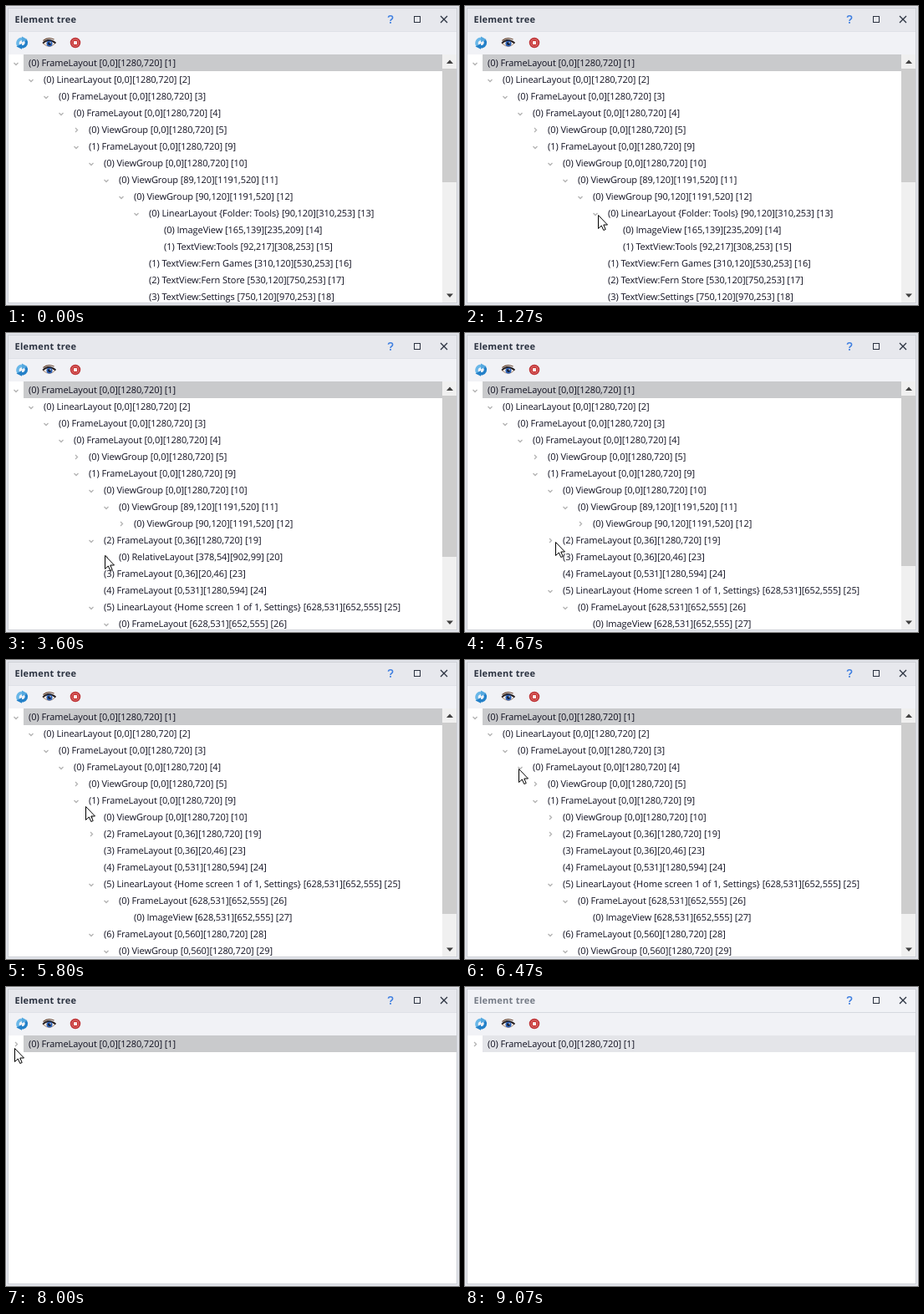
Animation of 542x358 px, one loop 9140 ms. Source, as an HTML page:

```html
<!DOCTYPE html>
<html lang="en">
<head>
<meta charset="utf-8">
<title>Element tree</title>
<style>
  html, body { margin: 0; width: 100%; height: 100%; overflow: hidden; background: #e3e5eb; }
  svg { display: block; }
  text {
    font: 11px "Open Sans", "Noto Sans", sans-serif;
    letter-spacing: -0.07px;
    text-rendering: geometricPrecision;
    fill: #101020;
    white-space: pre;
  }
  #title { font-weight: 700; letter-spacing: 0.25px; fill: #2b3240; }
  #titlebar { fill: #e7e8ed; }
  #separator { stroke: #dfe1e7; }
  #selected { fill: #c9cacc; }
  .inactive #title { fill: #757b86; }
  .inactive #titlebar { fill: #f1f2f6; }
  .inactive #separator { stroke: #d6d9df; }
  .inactive #selected { fill: #e4e5e9; }
  .chevron { fill: none; stroke: #b2b2b2; stroke-width: 1.3; }
</style>
</head>
<body>
<svg id="stage" width="542" height="358" viewBox="0 0 542 358">
  <rect width="542" height="358" fill="#e3e5eb"/>
  <rect id="titlebar" x="2" y="2" width="538" height="28"/>
  <rect x="2" y="30" width="538" height="28" fill="#f1f2f6"/>
  <rect x="3" y="58" width="536" height="297" fill="#fff"/>
  <path id="separator" d="M3 30.5H539"/>

  <text id="title" x="10.5" y="20">Element tree</text>
  <path d="M457.5 13.8Q457.5 11.7 460 11.7Q462.6 11.7 462.6 13.9Q462.6 15.2 461.2 16Q460 16.7 460 18" fill="none" stroke="#3f7fe0" stroke-width="1.6"/>
  <rect x="459.1" y="19" width="1.8" height="1.8" fill="#3f7fe0"/>
  <rect x="488.5" y="12.5" width="7" height="7" fill="none" stroke="#2b3240"/>
  <path d="M520 12L528 20M528 12L520 20" stroke="#2b3240" stroke-width="1.3"/>

  <g id="refresh">
    <path d="M15 47.500A5 5 0 0 1 18 39.500H20" fill="none" stroke="#69b7e8" stroke-width="3.400"/>
    <path d="M19 36.500L25.500 40L19 43.500Z" fill="#55a9e0"/>
    <path d="M23.500 41A5 5 0 0 1 20.500 48.800H18" fill="none" stroke="#2380c8" stroke-width="3.400"/>
    <path d="M19 51.800L12.500 48.500L19 45Z" fill="#2380c8"/>
  </g>

  <g id="eye">
    <path d="M44.500 45Q51 38.500 59 44.500Q52.500 52 44.500 45Z" fill="#fbf6f0" stroke="#9b7a62" stroke-width=".9"/>
    <path d="M44 44.500Q51 37.500 59.500 44.500" fill="none" stroke="#201a1c" stroke-width="1.700"/>
    <path d="M44.500 41.500Q50 36.500 57.500 40" fill="none" stroke="#6c4a36" stroke-width="1.200"/>
    <circle cx="52" cy="45" r="3.600" fill="#2c5fb4"/>
    <circle cx="52" cy="45" r="1.800" fill="#101828"/>
    <circle cx="53" cy="44" r=".8" fill="#fff"/>
  </g>

  <g id="stop">
    <circle cx="83" cy="44" r="5.400" fill="#e08a89" stroke="#bf3336" stroke-width="1.700"/>
    <circle cx="83" cy="44" r="3.700" fill="#c9302f"/>
    <rect x="81" y="42" width="4" height="4" rx=".5" fill="#f8eaea"/>
  </g>

  <rect id="selected" x="21" y="58" height="20"/>
  <g id="rows"></g>

  <g id="scrollbar">
    <rect x="522" y="58" width="17" height="297" fill="#f0f0f0"/>
    <rect id="thumb" x="522" y="75" width="17" fill="#cdcdcd"/>
    <path d="M527 69L531 64.500L535 69ZM527 344.500L531 349L535 344.500Z" fill="#404040"/>
  </g>

  <rect x="0" y="355" width="542" height="3" fill="#e3e5eb"/>
  <rect x="2.500" y="2.500" width="537" height="353" fill="none" stroke="#cdd0d6"/>
  <path id="cursor" d="M.5 .5V16.500L4.300 13L6.800 18.500L9.200 17.500L6.800 12H11.500Z" fill="#fff" stroke="#000"/>
</svg>

<script>
const LOOP = 9140;
const TICK = 200 / 3;
const TOP = 68, ROW = 20, INDENT = 18;
const LEAVE = 136;

// id, depth, label
const nodes = [
  [1, 0, "(0) FrameLayout [0,0][1280,720]"],
  [2, 1, "(0) LinearLayout [0,0][1280,720]"],
  [3, 2, "(0) FrameLayout [0,0][1280,720]"],
  [4, 3, "(0) FrameLayout [0,0][1280,720]"],
  [5, 4, "(0) ViewGroup [0,0][1280,720]"],
  [9, 4, "(1) FrameLayout [0,0][1280,720]"],
  [10, 5, "(0) ViewGroup [0,0][1280,720]"],
  [11, 6, "(0) ViewGroup [89,120][1191,520]"],
  [12, 7, "(0) ViewGroup [90,120][1191,520]"],
  [13, 8, "(0) LinearLayout {Folder: Tools} [90,120][310,253]"],
  [14, 9, "(0) ImageView [165,139][235,209]"],
  [15, 9, "(1) TextView:Tools [92,217][308,253]"],
  [16, 8, "(1) TextView:Fern Games [310,120][530,253]"],
  [17, 8, "(2) TextView:Fern Store [530,120][750,253]"],
  [18, 8, "(3) TextView:Settings [750,120][970,253]"],
  [19, 5, "(2) FrameLayout [0,36][1280,720]"],
  [20, 6, "(0) RelativeLayout [378,54][902,99]"],
  [21, 7, "(0) EditText:Search Games and Apps [378,54][902,99]"],
  [22, 7, "(1) View [858,64][860,88]"],
  [23, 5, "(3) FrameLayout [0,36][20,46]"],
  [24, 5, "(4) FrameLayout [0,531][1280,594]"],
  [25, 5, "(5) LinearLayout {Home screen 1 of 1, Settings} [628,531][652,555]"],
  [26, 6, "(0) FrameLayout [628,531][652,555]"],
  [27, 7, "(0) ImageView [628,531][652,555]"],
  [28, 5, "(6) FrameLayout [0,560][1280,720]"],
  [29, 6, "(0) ViewGroup [0,560][1280,720]"],
  [30, 7, "(0) View [0,560][1280,720]"]
];

// tick at which each node closes
const closeAt = { 5: 0, 13: 20, 12: 33, 20: 54, 19: 70, 10: 81, 4: 98, 1: 114 };

// tick, x, y; the last value marks a stop, reached with easing
const path = [
  [11, 196, 350, 0], [19, 159, 250, 1],
  [25, 159, 250, 0], [31, 142, 231, 1],
  [40, 142, 231, 0], [52, 118, 266, 1],
  [64, 118, 266, 0], [69, 108, 250, 1],
  [71, 108, 250, 0], [78, 105, 197, 0], [80, 104, 190, 1],
  [84, 104, 190, 0], [87, 95, 175, 0], [97, 64, 130, 1],
  [99, 64, 130, 0], [105, 31, 96, 0], [112, 14, 71, 1],
  [117, 14, 71, 0], [123, 7, 75, 1]
];

const $ = id => document.getElementById(id);

function add(parent, tag, attrs) {
  const el = document.createElementNS("http://www.w3.org/2000/svg", tag);
  for (const key in attrs) el.setAttribute(key, attrs[key]);
  return parent.appendChild(el);
}

const rows = nodes.map(([id, depth, label], i) => {
  const g = add($("rows"), "g", {});
  add(g, "text", { x: 27 + depth * INDENT, y: 4 }).textContent = `${label} [${id}]`;
  const next = nodes[i + 1];
  const parent = id in closeAt || (next && next[1] > depth);
  const chevron = parent && add(g, "path", {
    class: "chevron", transform: `translate(${12 + depth * INDENT} 0)`
  });
  return { id, depth, g, chevron };
});

function drawTree(tick) {
  let count = 0;
  let hiddenBelow = Infinity;
  for (const { id, depth, g, chevron } of rows) {
    if (depth <= hiddenBelow) hiddenBelow = Infinity;
    const shown = hiddenBelow === Infinity;
    g.style.display = shown ? "" : "none";
    if (!shown) continue;
    const closed = tick >= closeAt[id];
    if (closed) hiddenBelow = depth;
    g.setAttribute("transform", `translate(0 ${TOP + count++ * ROW})`);
    if (chevron) chevron.setAttribute("d", closed ? "M-1 -2L1.5 .5L-1 3" : "M-2.5 0L0 2.5L2.5 0");
  }
  const scrolls = count > 14;
  $("scrollbar").style.display = scrolls ? "" : "none";
  $("thumb").setAttribute("height", Math.round(1 + 3650 / count));
  $("selected").setAttribute("width", scrolls ? 501 : 518);
}

function cursorAt(tick) {
  const i = path.findIndex(p => p[0] > tick);
  if (i < 0) return path[path.length - 1].slice(1, 3);
  const a = path[i - 1], b = path[i];
  let p = (tick - a[0]) / (b[0] - a[0]);
  if (b[3]) p *= 1.4 - 0.4 * p;
  return [1, 2].map(k => Math.round(a[k] + (b[k] - a[k]) * p));
}

function draw(tick) {
  drawTree(tick);
  $("stage").classList.toggle("inactive", tick >= LEAVE);
  const visible = tick >= path[0][0] && tick < LEAVE;
  $("cursor").style.display = visible ? "" : "none";
  if (visible) $("cursor").setAttribute("transform", `translate(${cursorAt(tick)})`);
}

let last = -1;
function frame() {
  const t = performance.now() % LOOP;
  const tick = Math.min(LEAVE, Math.floor((t + 5) / TICK));
  if (tick !== last) draw(last = tick);
  requestAnimationFrame(frame);
}
frame();
</script>
</body>
</html>
```
